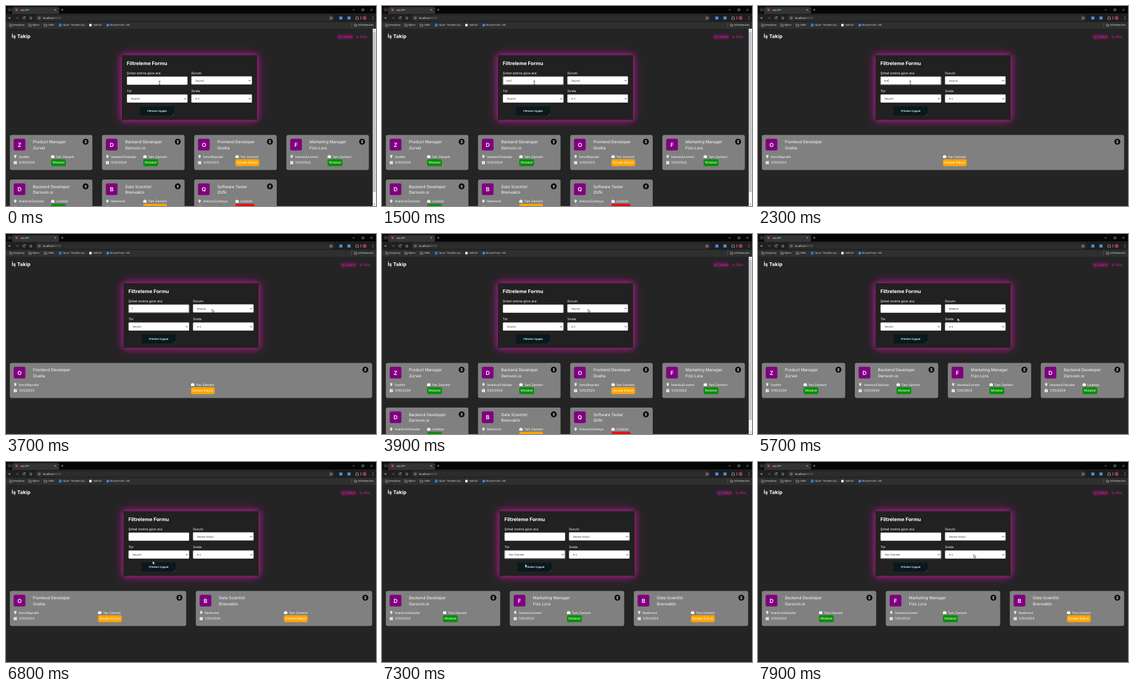
Recreate the animation shown at these times as an HTML page. Size 600 px wide and 325 px high, loop 8 s.

```html
<!DOCTYPE html>
<html lang="tr">
<head>
<meta charset="utf-8">
<title>Job APP</title>
<style>
  html, body { margin: 0; width: 100%; height: 100%; overflow: hidden; background: #242424; }
  svg { display: block; width: 100vw; height: 100vh; }
  text { font-family: Inter, "Open Sans", sans-serif; fill: #fff; text-rendering: geometricPrecision; white-space: pre; }
  .chrome text { font-family: Roboto, sans-serif; fill: #e6e6e6; }
  .chrome .dim { fill: #9a9a9a; }
  .line { fill: none; stroke: #d0d0d0; stroke-width: .6; }
  .field { fill: #fff; stroke: #8a8a8a; stroke-width: .3; }
  .focused { stroke: #777; stroke-width: 1.3; }
  .form .value { fill: #333; }
  .nav text { fill: #d916a6; }
</style>
</head>
<body>
<svg viewBox="0 0 600 325">
  <defs>
    <filter id="glow" x="-20%" y="-40%" width="140%" height="180%"><feGaussianBlur stdDeviation="4"/></filter>
    <filter id="halo" x="-30%" y="-60%" width="160%" height="220%"><feGaussianBlur stdDeviation="9"/></filter>
    <filter id="soft" x="-50%" y="-100%" width="200%" height="300%"><feGaussianBlur stdDeviation="1.8"/></filter>
  </defs>
  <rect width="600" height="325" fill="#242424"/>
  <g id="page"></g>
  <g id="chrome" class="chrome"></g>
  <g id="beam"><path d="M-1.5-3H1.5M0-3V3M-1.5 3H1.5" fill="none" stroke="#222" stroke-width=".7"/></g>
  <g id="arrow"><path d="M0 0V5.4L1.3 4.3 2.2 6.2 3.1 5.8 2.2 3.9H4Z" fill="#fff" stroke="#111" stroke-width=".5"/></g>
</svg>
<script>
const LOOP = 8000, TICK = 100;
const $ = id => document.getElementById(id);

const STATUS = {
  'Mülakat': { color: '#068f06', width: 24 },
  'Devam Ediyor': { color: '#ffa500', width: 38.5 },
  'Reddedildi': { color: '#f00808', width: 31 }
};
const JOBS = [
  ['Product Manager', 'Zurvel', 'Seattle', 'Yarı Zamanlı', '3/10/2024', 'Mülakat'],
  ['Backend Developer', 'Dersvon.io', 'İstanbul/Üsküdar', 'Tam Zamanlı', '1/25/2024', 'Mülakat'],
  ['Frontend Developer', 'Ovelta', 'İzmir/Bayraklı', 'Yarı Zamanlı', '1/25/2023', 'Devam Ediyor'],
  ['Marketing Manager', 'Fizo Lora', 'İstanbul/Levent', 'Tam Zamanlı', '1/25/2022', 'Mülakat'],
  ['Backend Developer', 'Dersvon.io', 'İstanbul/Üsküdar', 'Uzaktan', '1/25/2024', 'Mülakat'],
  ['Data Scientist', 'Brenvakto', 'Redmond', 'Tam Zamanlı', '1/25/2024', 'Devam Ediyor'],
  ['Software Tester', 'QVN', 'Ankara/Çankaya', 'Uzaktan', '1/25/2023', 'Reddedildi']
];
const ALL = JOBS.map((_, i) => i);

// [time, changed values]
const STEPS = [
  [0, { jobs: ALL, query: '', status: 'Seçiniz', type: 'Seçiniz', focus: '', edited: 0 }],
  [200, { focus: 'query', edited: 200 }],
  [600, { query: 'o', edited: 600 }],
  [900, { query: 'ov', edited: 900 }],
  [1100, { query: 'ove', edited: 1100 }],
  [1600, { jobs: [2] }],
  [3100, { query: 'ov', edited: 3100 }],
  [3200, { query: 'o', edited: 3200 }],
  [3300, { query: '', edited: 3300 }],
  [3800, { jobs: ALL }],
  [3900, { focus: '' }],
  [4800, { jobs: [0, 1, 3, 4], status: 'Mülakat' }],
  [5900, { jobs: [2, 5], status: 'Devam Ediyor' }],
  [7000, { jobs: [1, 3, 5], type: 'Tam Zamanlı', focus: 'type' }]
];
// [time, x, y] of the pointer tip
const POINTER = [
  [0, 249, 125], [900, 249, 125], [1000, 247, 125], [3200, 247, 125],
  [3600, 334, 122], [4000, 334, 122], [4500, 321.5, 132], [4900, 321.5, 132],
  [5200, 324, 122], [5300, 324, 122], [5700, 323.5, 136.5], [6000, 323.5, 136.5],
  [6400, 250, 150], [6500, 250, 150], [6700, 256.5, 166.5], [6800, 237.7, 161],
  [7200, 237.7, 161], [7500, 221, 175], [7700, 364, 145], [7900, 349.7, 150], [LOOP, 349.7, 150]
];

const text = (x, y, size, str, attrs = '') => `<text x="${x}" y="${y}" font-size="${size}" ${attrs}>${str}</text>`;
const rect = (x, y, w, h, fill, r = 0, attrs = '') =>
  `<rect x="${x}" y="${y}" width="${w}" height="${h}" rx="${r}" fill="${fill}" ${attrs}/>`;
const dot = (x, y, r, fill) => `<circle cx="${x}" cy="${y}" r="${r}" fill="${fill}"/>`;
const line = (d, attrs = '') => `<path class="line" d="${d}" ${attrs}/>`;
const shape = (x, y, d, fill = '#fff') => `<path transform="translate(${x} ${y})" d="${d}" fill="${fill}" fill-rule="evenodd"/>`;

const ICON = {
  pin: 'M0 2.8C-1 1.2-1.9.2-1.9-.9A1.9 1.9 0 0 1 1.9-.9C1.9.2 1 1.2 0 2.8ZM-.7-.9A.7.7 0 0 0 .7-.9 .7.7 0 0 0-.7-.9Z',
  bag: 'M-2.7-1.4H-1.3V-2.5H1.3V-1.4H2.7V2.3H-2.7ZM-.7-1.4H.7V-1.9H-.7Z',
  calendar: 'M-2.4-2H-1.6V-2.7H-.9V-2H.9V-2.7H1.6V-2H2.4V2.6H-2.4ZM-1.7-.6V-.2H1.7V-.6ZM-.6.6V1.6H.6V.6Z',
  trash: 'M-1.8-2H-.7V-2.4H.7V-2H1.8V-1.5H-1.8ZM-1.5-1.1H1.5L1.3 2.4H-1.3ZM-.8-.5V1.8H-.3V-.5ZM.3-.5V1.8H.8V-.5Z'
};

function browser() {
  const folder = x => line(`M${x - 2} 29.3h1.5l.6.7h2v3h-4.1Z`);
  return rect(0, 0, 600, 13, '#050505') + rect(0, 12, 600, 14, '#1f1f1f') + rect(0, 26, 600, 11, '#2f2f2f') +
    rect(10, 1.5, 76, 11.5, '#343434', 2.5) + rect(2, 2, 8, 8, '#202020', 2.5) +
    line('M4.8 5.5L6 6.8 7.2 5.5') + dot(17, 6.3, 2, '#b84b62') + text(22.5, 7.7, 3.9, 'Job APP') +
    line('M78.8 5l2.4 2.4m0-2.4l-2.4 2.4M89.5 6.2h3.4m-1.7-1.7v3.4') +
    line('M562 6.2h3.4M577.2 4.8h3v3h-3ZM591 4.7l3 3m0-3l-3 3') +
    line('M8 19.4H4.4m1.7-1.7L4.4 19.4l1.7 1.7') +
    line('M16.4 19.4H20m-1.7-1.7L20 19.4l-1.7 1.7', 'opacity=".5"') +
    line('M31 18.2a2 2 0 1 0 .2 1.8M31.3 16.9v1.6h-1.6M38.3 19.3l2-1.9 2 1.9M39 18.7v2.4h2.7v-2.4') +
    rect(48, 14.6, 485, 9.8, '#2c2c2c', 4.9) + dot(54, 19.5, 3.4, '#3c3c3c') +
    line('M52.5 18.6h3M52.5 20.4h3') +
    text(60, 20.9, 4.4, 'localhost<tspan class="dim">:5173</tspan>') +
    line('M527 17.2l.7 1.5 1.6.2-1.2 1.1.3 1.6-1.4-.8-1.4.8.3-1.6-1.2-1.1 1.6-.2Z') +
    rect(540.5, 17, 5, 5, '#4f83e8', .6) + rect(553.7, 17, 5, 5, '#4b8fd6', .6) +
    line('M567.3 18h1.2a.8.8 0 0 1 1.6 0h1.2v1.2a.8.8 0 0 1 0 1.6v1.1h-4Z') +
    line('M575.4 17v5') + dot(581.5, 19.4, 3.1, '#9b3b45') +
    [17.6, 19.4, 21.2].map(y => dot(595, y, .5, '#ddd')).join('') +
    [[8, 'Everything'], [39, 'Eğitim'], [64, 'CDN\'s'], [567, 'All Bookmarks']]
      .map(([x, name]) => folder(x) + text(x + 4.2, 32.4, 3.8, name)).join('') +
    rect(85.5, 28.8, 4.6, 4.6, '#2d6fe0', .5) + text(92.5, 32.4, 3.8, 'Quvra - The New Lan...') +
    dot(137, 31.1, 2.3, '#ececec') + text(141.3, 32.4, 3.8, 'TalkVLO') +
    dot(165, 31.1, 2.3, '#4285f4') + text(169, 32.4, 3.8, 'Browse Fonts - Vel...') +
    line('M560.5 27.5v7', 'opacity=".4"');
}

function card([title, company, place, type, date, status], x, y, w) {
  const mid = x + w / 2, badge = STATUS[status];
  const del = x + w - 11;
  return `<g>${rect(x, y, w, 57, '#808080', 3)}` +
    rect(x + 6.2, y + 6.2, 19, 19, '#800080', 2.5) +
    text(x + 15.7, y + 19, 9, company[0], 'text-anchor="middle" font-weight="600"') +
    text(x + 37.5, y + 13.5, 6.5, title) + text(x + 37.5, y + 23, 6.5, company) +
    dot(del, y + 11, 4.8, '#080808') + shape(del, y + 11, ICON.trash, '#c4c4c4') +
    shape(x + 8.8, y + 35.2, ICON.pin) + text(x + 14.5, y + 37.2, 5.1, place) +
    shape(mid + 2.7, y + 35.2, ICON.bag) + text(mid + 7.9, y + 37.2, 5.1, type) +
    shape(x + 8.8, y + 44.9, ICON.calendar) + text(x + 14.5, y + 46.9, 5.3, date) +
    rect(mid, y + 39.5, badge.width, 11.2, badge.color, 2.8) +
    text(mid + badge.width / 2, y + 46.9, 5.2, status, 'text-anchor="middle"') + '</g>';
}

function form(s, caret) {
  const field = (x, y, on) => rect(x, y, 98.2, 13.2, '#fff', 1.2, `class="field ${on ? 'focused' : ''}"`);
  const select = (x, y, value, on) => field(x, y, on) + text(x + 6.4, y + 8.5, 4.2, value, 'class="value"') +
    `<path d="M${x + 92.7} ${y + 6}l1.6 1.7 1.6-1.7" fill="none" stroke="#222" stroke-width=".8"/>`;
  return rect(187, 79, 221, 107, '#c21c98', 3, 'filter="url(#halo)" opacity=".6"') +
    rect(187, 79, 221, 107, '#c21c98', 3, 'filter="url(#glow)" opacity=".7"') +
    rect(188, 80, 219, 105, '#212121') +
    text(195.8, 96, 8, 'Filtreleme Formu', 'font-weight="700"') +
    text(195.8, 110.7, 5.3, 'Şirket ismine göre ara:') + text(300.5, 110.7, 5.3, 'Durum') +
    text(195.8, 140.2, 5.3, 'Tür') + text(300.5, 140.2, 5.3, 'Sırala') +
    field(196.1, 114.7, s.focus === 'query') +
    text(201, 122.7, 4.5, `${s.query}<tspan fill-opacity="${+caret}">|</tspan>`, 'class="value"') +
    select(300.6, 114.3, s.status) + select(196.1, 143.7, s.type, s.focus === 'type') +
    select(300.6, 143.7, 'a-z') +
    rect(217.5, 163.3, 54.8, 14.4, '#08191f') +
    text(245, 171.9, 4.15, 'Filtreleri Uygula', 'text-anchor="middle" font-weight="600"') +
    dot(271, 176.4, .9, '#c4323c');
}

function scrollbar() {
  return rect(594.7, 37, 5.3, 288, '#f4f4f4') + rect(595.2, 42, 4.3, 260, '#c4c4c4') +
    shape(597.4, 39.6, 'M-1.2.8L0-.8 1.2.8Z', '#666') + shape(597.4, 322.4, 'M-1.2-.8L0 .8 1.2-.8Z', '#666');
}

function page(s, caret) {
  const scrolls = s.jobs.length > 4, bar = scrolls ? 5.3 : 0;
  const columns = Math.min(s.jobs.length, 4), gap = 15.6, left = 6.25;
  const width = (600 - bar - 2 * left - gap * (columns - 1)) / columns;
  const cards = s.jobs.map((id, i) =>
    card(JOBS[id], left + (i % columns) * (width + gap), 209.5 + Math.floor(i / columns) * 72.6, width));
  return text(9.3, 52.3, 8.1, 'İş Takip', 'font-weight="700"') +
    `<g class="nav" transform="translate(${-bar})">` +
    rect(543, 46, 25, 8, '#a3147d', 2, 'filter="url(#soft)" opacity=".38"') +
    text(543.2, 51.8, 5.8, 'İş Listesi') + text(573.2, 51.8, 5.8, 'İş Ekle') + '</g>' +
    `<g class="form" transform="translate(${(5.3 - bar) / 2})">${form(s, caret)}</g>` + cards.join('') +
    (scrolls ? scrollbar() : '');
}

function pointerAt(t) {
  const i = POINTER.findIndex(p => p[0] > t);
  const [t0, x0, y0] = POINTER[i - 1], [t1, x1, y1] = POINTER[i];
  const k = (t - t0) / (t1 - t0);
  return [x0 + (x1 - x0) * k, y0 + (y1 - y0) * k];
}

let shown = '';
function render(time) {
  const t = Math.floor(time % LOOP / TICK) * TICK;
  const s = Object.assign({}, ...STEPS.filter(step => step[0] <= t).map(step => step[1]));
  const caret = s.focus === 'query' && Math.floor((t - s.edited) / 500) % 2 === 0;
  const key = JSON.stringify([s, caret]);
  if (key !== shown) {
    shown = key;
    $('page').innerHTML = page(s, caret);
  }
  const [x, y] = pointerAt(t);
  const overInput = x < 294 && y > 114 && y < 128;
  for (const id of ['beam', 'arrow']) {
    $(id).setAttribute('transform', `translate(${x} ${y})`);
    $(id).style.display = (id === 'beam') === overInput ? '' : 'none';
  }
}

$('chrome').innerHTML = browser();
const start = performance.now();
function loop() {
  render(performance.now() - start);
  requestAnimationFrame(loop);
}
loop();
</script>
</body>
</html>
```
